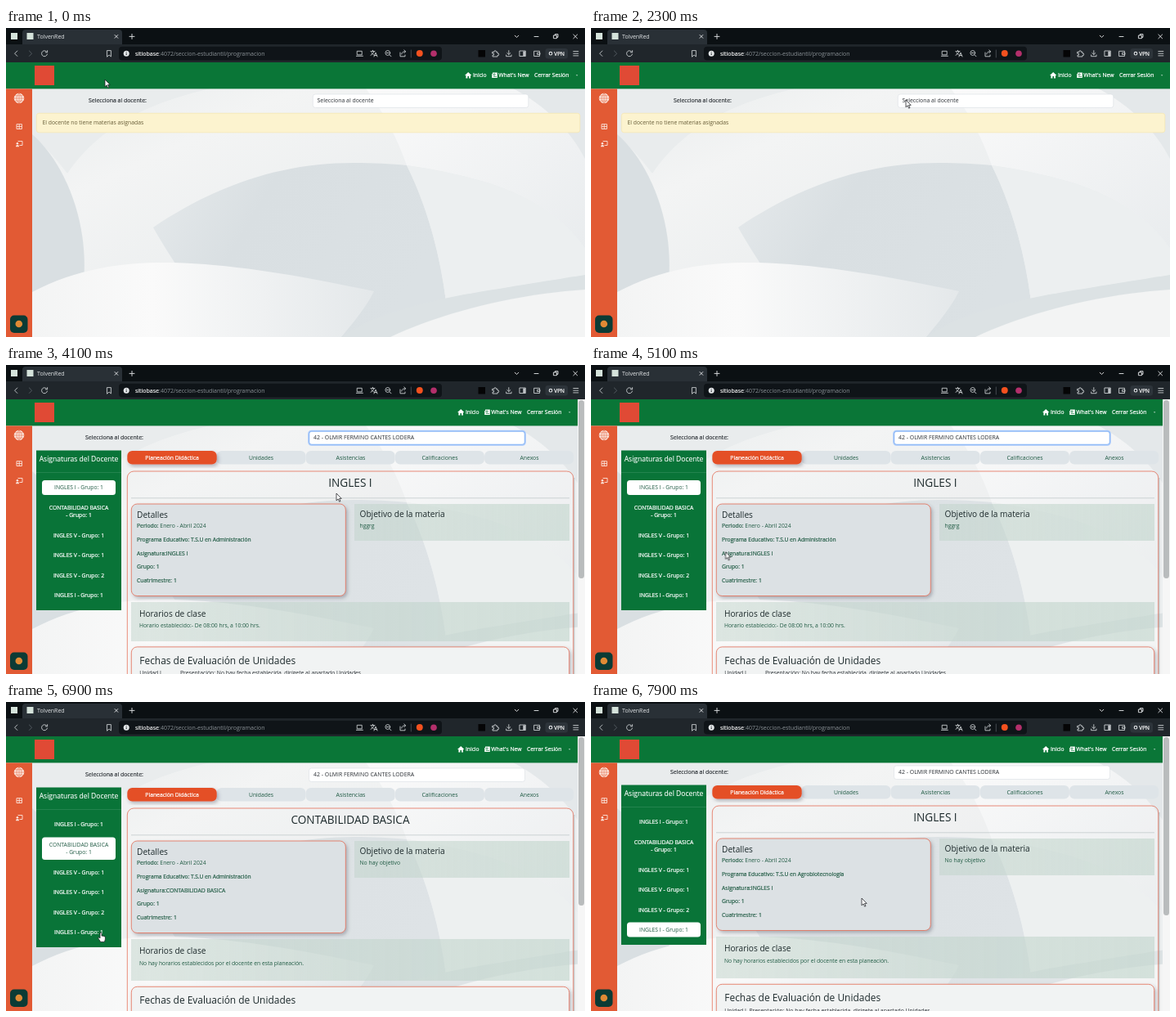
Recreate the animation shown at these times as an HTML page. Size 708 by 378 pixels, loop 8 s.

```html
<!DOCTYPE html>
<html lang="es">
<head>
<meta charset="utf-8">
<title>Planeaciones</title>
<style>
html, body { margin: 0; width: 100%; height: 100%; overflow: hidden; background: #eef0f0; }
svg { display: block; width: 100vw; height: 100vh; }
text { font: 6.8px "Open Sans", "Noto Sans", sans-serif; fill: #1f5a43; white-space: pre; }
.mid { text-anchor: middle; }
.med { stroke: #1f5a43; stroke-width: .18; }
.white { fill: #fff; stroke: #fff; stroke-width: .22; }
.dark { fill: #2b3035; }
.bold { stroke: #2b3035; stroke-width: .18; }
.h1 { font-size: 13.6px; fill: #1d2a2c; text-anchor: middle; }
.h2 { font-size: 10.15px; fill: #1d2a2c; }
.h3 { font-size: 11.95px; fill: #1d2a2c; }
.line { fill: none; stroke: #c9cdd0; stroke-width: .9; stroke-linecap: round; stroke-linejoin: round; }
.side { fill: none; stroke: #fbe6de; stroke-width: .9; }
.card { stroke: #e2654c; stroke-width: .75; }
.mint { fill: url(#mint); }
.ring { fill: none; stroke: #a9c9fb; stroke-width: 1.6; }
.edge { fill: #fff; stroke: #d9dee2; stroke-width: .6; }
.focused { stroke: #6ea6f5; stroke-width: .7; fill: none; }

.empty, .full, .scroll, .v1, .v2, .v3, .nav, .focus, .arrow, .hand, .dates, .list1, .list2, .list6, .cursor {
  animation: 8s step-end infinite;
}
.empty { animation-name: empty; }
.full { animation-name: full, nudge; }
.scroll { animation-name: full; }
.v1 { animation-name: first; }
.v2 { animation-name: second; }
.v3 { animation-name: third; }
.nav { animation-name: nav; }
.focus { animation-name: focus; }
.arrow { animation-name: arrow; }
.hand { animation-name: hand; }
.dates { animation-name: dates; }
.list1 { animation-name: lit1; animation-timing-function: linear; }
.list2 { animation-name: lit2; animation-timing-function: linear; }
.list6 { animation-name: lit6; animation-timing-function: linear; }
.cursor { animation-name: move; animation-timing-function: linear; }

@keyframes empty { 0% { visibility: visible } 47.5%, 100% { visibility: hidden } }
@keyframes full { 0% { visibility: hidden } 47.5%, 100% { visibility: visible } }
@keyframes first { 0% { visibility: hidden } 47.5% { visibility: visible } 70%, 100% { visibility: hidden } }
@keyframes second { 0% { visibility: hidden } 70% { visibility: visible } 92.5%, 100% { visibility: hidden } }
@keyframes third { 0% { visibility: hidden } 92.5%, 100% { visibility: visible } }
@keyframes nudge { 0% { transform: none } 92.5%, 100% { transform: translateY(-3px) } }
@keyframes nav { 0% { transform: none } 47.5%, 100% { transform: translateX(-9px) } }
@keyframes focus { 0% { opacity: 0 } 31.25% { opacity: 1 } 70%, 100% { opacity: 0 } }
@keyframes dates { 0% { transform: translateY(-3.4px) } 70%, 100% { transform: none } }
@keyframes arrow { 0% { visibility: visible } 64% { visibility: hidden } 93.75%, 100% { visibility: visible } }
@keyframes hand { 0% { visibility: hidden } 64% { visibility: visible } 93.75%, 100% { visibility: hidden } }
@keyframes lit1 { 0%, 70.8% { opacity: 1 } 73.4%, 100% { opacity: 0 } }
@keyframes lit2 { 0%, 70.6% { opacity: 0 } 73.2%, 93% { opacity: 1 } 95.6%, 100% { opacity: 0 } }
@keyframes lit6 { 0%, 93% { opacity: 0 } 95.6%, 100% { opacity: 1 } }
@keyframes move {
  0%, 1.25% { transform: translate(121px, 63px) }
  6.25% { transform: translate(430px, 58px) }
  10% { transform: translate(655px, 90px) }
  12.5% { transform: translate(620px, 143px) }
  13.75%, 18.75% { transform: translate(621px, 136px) }
  22.5% { transform: translate(560px, 146px) }
  25.5% { transform: translate(360px, 112px) }
  27.5% { transform: translate(330px, 75px) }
  28.75%, 31.25% { transform: translate(385px, 88px) }
  41.25% { transform: translate(403px, 156px) }
  42.5%, 57.5% { transform: translate(404px, 157px) }
  60% { transform: translate(330px, 230px) }
  62.5% { transform: translate(210px, 268px) }
  65% { transform: translate(120px, 190px) }
  66.9% { transform: translate(108px, 114px) }
  68.75%, 71.25% { transform: translate(112.5px, 185px) }
  80% { transform: translate(117px, 232px) }
  83.75% { transform: translate(121px, 268px) }
  86.25%, 92.5% { transform: translate(116px, 282px) }
  98.75%, 100% { transform: translate(331px, 240px) }
}
</style>
</head>
<body>
<svg viewBox="0 0 708 378" preserveAspectRatio="none">
  <defs>
    <linearGradient id="base" x1="0" y1="0" x2="1" y2="1">
      <stop offset="0" stop-color="#e6eaeb"/><stop offset=".3" stop-color="#f3f4f4"/>
      <stop offset=".65" stop-color="#eaedee"/><stop offset="1" stop-color="#f4f5f5"/>
    </linearGradient>
    <linearGradient id="hill" x1="0" y1="0" x2="1" y2=".35">
      <stop offset="0" stop-color="#e6eaec"/><stop offset=".4" stop-color="#d9dfe2"/><stop offset="1" stop-color="#dbe1e4"/>
    </linearGradient>
    <linearGradient id="snow" x1="0" y1="0" x2="1" y2="0">
      <stop offset="0" stop-color="#f3f4f4"/><stop offset=".35" stop-color="#fafafa"/><stop offset="1" stop-color="#e4e8ea"/>
    </linearGradient>
    <linearGradient id="petal" x1="0" y1="0" x2="1" y2="1">
      <stop offset="0" stop-color="#fafafa"/><stop offset="1" stop-color="#e9ecee"/>
    </linearGradient>
    <linearGradient id="mint">
      <stop offset="0" stop-color="#bfd2c9" stop-opacity=".5"/><stop offset="1" stop-color="#c3d6cd" stop-opacity=".65"/>
    </linearGradient>
    <filter id="drop" x="-5%" y="-10%" width="112%" height="135%">
      <feDropShadow dx="2" dy="2.5" stdDeviation="2" flood-color="#445" flood-opacity=".35"/>
    </filter>
  </defs>

  <!-- backdrop -->
  <rect y="42" width="708" height="336" fill="url(#base)"/>
  <path d="M32 74H250C190 88 120 112 75 178C60 158 45 142 32 132Z" fill="#e9eced"/>
  <path d="M32 130C72 165 104 240 94 320L32 340Z" fill="#d9dfe2"/>
  <path d="M440 74H708V270C680 230 640 205 585 188C550 178 520 172 490 168C478 134 463 105 440 74Z" fill="url(#petal)"/>
  <path d="M620 74H708V160C690 125 660 95 620 74Z" fill="#e4e8ea"/>
  <path d="M180 244C260 190 340 165 425 165C450 165 470 166 490 168C512 212 530 270 538 334L470 378H260C230 320 200 280 180 244Z" fill="url(#hill)"/>
  <path d="M490 168C520 172 550 178 585 188C640 205 680 230 708 270V310C640 312 590 322 538 334C530 270 512 212 490 168Z" fill="#eceff0"/>
  <path d="M32 323C90 292 150 286 205 287C300 290 390 310 450 322C440 342 425 360 410 378H32Z" fill="url(#snow)"/>
  <path d="M410 378C450 350 500 338 560 326C620 316 670 308 708 302V378Z" fill="#dce2e4"/>
  <path d="M470 378C540 345 630 325 708 320V378Z" fill="#f3f4f4"/>

  <!-- no subjects assigned -->
  <g class="empty">
    <text class="dark bold" x="101" y="91.4" style="font-size:6.9px">Selecciona al docente:</text>
    <rect class="edge" x="375.3" y="81" width="263.5" height="16.5" rx="3"/>
    <g class="focus">
      <rect class="ring" x="374.7" y="80.5" width="264.7" height="17.5" rx="3.4"/>
      <rect class="focused" x="375.5" y="81.2" width="263" height="16" rx="3"/>
    </g>
    <text class="dark" x="380.5" y="91.4" style="font-size:6.9px">Selecciona al docente</text>
    <rect x="37.3" y="104.3" width="664.5" height="23.5" rx="3" fill="#fcf3cf" stroke="#f5e6ae" stroke-width=".7"/>
    <text x="44.5" y="118.4" style="fill:#665c37">El docente no tiene materias asignadas</text>
  </g>

  <!-- teacher chosen -->
  <g class="full">
    <text class="dark bold" x="97" y="91.4" style="font-size:6.9px">Selecciona al docente:</text>
    <rect class="edge" x="370.5" y="81" width="264" height="16.5" rx="3"/>
    <g class="focus">
      <rect class="ring" x="370" y="80.5" width="265" height="17.5" rx="3.4"/>
      <rect class="focused" x="370.8" y="81.2" width="263.4" height="16" rx="3"/>
    </g>
    <text class="dark" x="376" y="91.4" style="font-size:6.95px">42 - OLMIR FERMINO CANTES LODERA</text>

    <rect x="37" y="104.5" width="104" height="195.5" fill="#097438"/>
    <path d="M37 131.5H141" stroke="#2f8c58" stroke-width=".7"/>
    <text class="white mid" x="89" y="118.4" style="font-size:8.55px;stroke-width:.1">Asignaturas del Docente</text>
    <g class="mid">
      <text class="white" x="89" y="152">INGLES I - Grupo: 1</text>
      <text class="white" x="89" y="176.5">CONTABILIDAD BASICA</text>
      <text class="white" x="89" y="186.3">- Grupo: 1</text>
      <text class="white" x="89" y="210.8">INGLES V - Grupo: 1</text>
      <text class="white" x="89" y="235.2">INGLES V - Grupo: 1</text>
      <text class="white" x="89" y="259.5">INGLES V - Grupo: 2</text>
      <text class="white" x="89" y="283.6">INGLES I - Grupo: 1</text>
      <g class="list1">
        <rect x="44" y="141" width="90" height="18" rx="3.5" fill="#fff"/>
        <text x="89" y="152">INGLES I - Grupo: 1</text>
      </g>
      <g class="list2">
        <rect x="44" y="165.5" width="90" height="27.5" rx="3.5" fill="#fff"/>
        <text x="89" y="176.5">CONTABILIDAD BASICA</text>
        <text x="89" y="186.3">- Grupo: 1</text>
      </g>
      <g class="list6">
        <rect x="44" y="272.5" width="90" height="18" rx="3.5" fill="#fff"/>
        <text x="89" y="283.6">INGLES I - Grupo: 1</text>
      </g>
    </g>

    <g fill="#dee4e8">
      <rect x="257.5" y="105" width="109" height="16.5" rx="6"/>
      <rect x="366.7" y="105" width="109" height="16.5" rx="6"/>
      <rect x="475.9" y="105" width="109" height="16.5" rx="6"/>
      <rect x="585.1" y="105" width="109" height="16.5" rx="6"/>
    </g>
    <rect x="148.3" y="105" width="109.4" height="16.5" rx="6" fill="#e44f26" filter="url(#drop)"/>
    <g class="mid">
      <text class="white" x="203" y="116">Planeación Didáctica</text>
      <text x="312" y="116">Unidades</text>
      <text x="421.5" y="116" style="font-size:7px">Asistencias</text>
      <text x="530.5" y="116" style="font-size:7px">Calificaciones</text>
      <text x="640" y="116">Anexos</text>
    </g>

    <rect class="card" x="148.3" y="130" width="545.4" height="300" rx="8" fill="#f6f7f7" fill-opacity=".12"/>
    <path d="M694.8 138V382" stroke="#8d9596" stroke-opacity=".4" stroke-width="1.4"/>
    <path d="M153 162.8H689" stroke="#bcc4c6" stroke-width=".7"/>
    <rect class="card" x="153.3" y="170" width="262" height="112.5" rx="7" fill="#dce1e4" filter="url(#drop)"/>
    <rect class="mint" x="426" y="170" width="263" height="45"/>
    <text class="h2" x="160" y="186.5">Detalles</text>
    <text class="h2" x="432.5" y="186.2">Objetivo de la materia</text>
    <text x="160" y="199.4"><tspan class="med">Periodo:</tspan> Enero - Abril 2024</text>
    <text class="med" x="160" y="249.1">Grupo: 1</text>
    <text class="med" x="160" y="265.7">Cuatrimestre: 1</text>

    <g class="v1">
      <rect class="mint" x="153" y="290" width="536" height="48"/>
      <text class="h1" x="421" y="149">INGLES I</text>
      <text class="med" x="160" y="216" style="font-size:6.7px">Programa Educativo: T.S.U en Administración</text>
      <text class="med" x="160" y="232.5">Asignatura:INGLES I</text>
      <text x="432.5" y="198.9">hggrg</text>
      <text x="163" y="321.3">Horario establecido:- De 08:00 hrs, a 10:00 hrs.</text>
    </g>
    <g class="v2">
      <rect class="mint" x="153" y="290" width="536" height="51"/>
      <text class="h1" x="421" y="149">CONTABILIDAD BASICA</text>
      <text class="med" x="160" y="216" style="font-size:6.7px">Programa Educativo: T.S.U en Administración</text>
      <text class="med" x="160" y="232.5">Asignatura:CONTABILIDAD BASICA</text>
      <text x="432.5" y="198.9">No hay objetivo</text>
      <text x="163" y="321.5" style="font-size:6.75px">No hay horarios establecidos por el docente en esta planeación.</text>
    </g>
    <g class="v3">
      <rect class="mint" x="153" y="290" width="536" height="51"/>
      <text class="h1" x="421" y="149">INGLES I</text>
      <text class="med" x="160" y="216" style="font-size:6.7px">Programa Educativo: T.S.U en Agrobiotecnología</text>
      <text class="med" x="160" y="232.5">Asignatura:INGLES I</text>
      <text x="432.5" y="198.9">No hay objetivo</text>
      <text x="163" y="321.5" style="font-size:6.75px">No hay horarios establecidos por el docente en esta planeación.</text>
    </g>
    <text class="h2" x="163" y="308.3">Horarios de clase</text>

    <g class="dates">
      <rect class="card" x="153.3" y="348.3" width="535.4" height="80" rx="7" fill="#f1f3f3" filter="url(#drop)"/>
      <text class="h3" x="163.3" y="369">Fechas de Evaluación de Unidades</text>
      <g class="v1">
        <text x="163.3" y="382.8" class="dark">Unidad I</text>
        <text x="213" y="382.8" class="dark">Presentación: No hay fecha establecida, dirígete al apartado Unidades.</text>
      </g>
      <g class="v2"><text x="163.3" y="382.6" class="dark">Unidad I. Presentación: No hay fecha establecida, dirígete al apartado Unidades</text></g>
      <g class="v3"><text x="163.3" y="382.6" class="dark">Unidad I. Presentación: No hay fecha establecida, dirígete al apartado Unidades</text></g>
    </g>
  </g>

  <!-- site header and side bar -->
  <rect y="42" width="708" height="32.4" fill="#0a7637"/>
  <rect x="35" y="46" width="24" height="24" fill="#e04a35"/>
  <g class="nav">
    <path d="M561 58L565.2 54L569.4 58H568V61.6H566V59H564.4V61.6H562.4V58Z" fill="#fff"/>
    <text class="white" x="571" y="60.3" style="font-size:6.7px">Inicio</text>
    <path d="M595 54.5H600.8V61H594.2V56H595Z" fill="#fff"/>
    <path d="M596 56H598V58H596ZM596 59.5H600" fill="none" stroke="#0a7637" stroke-width=".6"/>
    <text class="white" x="602.3" y="60.3">What's New</text>
    <text class="white" x="646" y="60.3" style="font-size:6.75px">Cerrar Sesión</text>
    <path d="M696.8 57.4H699.4L698.1 58.6Z" fill="#fff"/>
  </g>
  <rect y="74.4" width="32" height="303.6" fill="#e25a34"/>
  <g class="side">
    <circle cx="16" cy="86" r="5.8" fill="#fbe6de"/>
    <path d="M10 86H22M11 82.8H21M11 89.2H21M16 80V92M16 79.8C12 83 12 89 16 92.2C20 89 20 83 16 79.8" stroke="#e25a34" stroke-width=".5"/>
    <path d="M13 117.7H19.4V123.5H13ZM13 120.6H19.4M16.2 117.7V123.5"/>
    <path d="M14.5 138.5H20V143.5H16.5"/>
    <path d="M12 145.2C12 142.4 16 142.4 16 145.2Z" fill="#fbe6de" stroke="none"/>
    <circle cx="13.9" cy="141.2" r="1.3" fill="#fbe6de" stroke="none"/>
  </g>
  <rect x="5" y="351.5" width="21.5" height="21.5" rx="5" fill="#0c3b35"/>
  <circle cx="15.8" cy="362" r="4.3" fill="#e08a35"/>

  <!-- scroll bar -->
  <g class="scroll">
    <rect x="699" y="42" width="9" height="336" fill="#f6f6f6"/>
    <g fill="#b9bcbd">
      <rect class="v1" x="700" y="43" width="7" height="218" rx="3.5"/>
      <rect class="v2" x="700" y="43" width="7" height="206" rx="3.5"/>
      <rect class="v3" x="700" y="43" width="7" height="218" rx="3.5"/>
    </g>
  </g>

  <!-- browser window -->
  <rect width="708" height="21" fill="#0b1013"/>
  <path d="M20 20V6Q20 2 24 2H138Q142 2 142 6V20Z" fill="#293036"/>
  <rect y="20" width="708" height="22" fill="#20262b"/>
  <rect x="138" y="22.8" width="395" height="16.6" rx="4" fill="#0f1418"/>
  <rect x="6" y="6" width="8" height="8" fill="#d5e3db"/>
  <rect x="25.5" y="6" width="8" height="8" fill="#d5e3db"/>
  <text x="38" y="12.6" style="fill:#e3e6e8;font-size:7px">TolvenRed</text>
  <text x="158" y="33.6" style="fill:#8b9297;font-size:7px"><tspan fill="#fff" stroke="#fff" stroke-width=".15">sitiobase</tspan>:4072/seccion-estudiantil/programacion</text>
  <g class="line">
    <path d="M133 8.5L136.8 12.3M136.8 8.5L133 12.3M151 10.4H157M154 7.4V13.4" stroke="#e6e8ea"/>
    <path d="M622.2 9.2L624.5 11.5L626.8 9.2M646 10.5H651M669.8 9H673.5V12.7H669.8ZM671.3 9V7.6H675V11.3H673.5M693.8 8L698.6 12.8M698.6 8L693.8 12.8" stroke="#e6e8ea"/>
    <path d="M13.8 28L10.6 31.2L13.8 34.4"/>
    <path d="M28.4 28L31.6 31.2L28.4 34.4" stroke="#596067"/>
    <path d="M50 29.3A3.5 3.5 0 1 0 50.5 32M50.6 27.6V29.8H48.4"/>
    <path d="M123.8 27.6H128.4V35L126.1 33L123.8 35Z"/>
    <path d="M429.6 28.3H435.2V32.8H429.6ZM428.4 34.3H436.4"/>
    <path d="M446 28.5H451M448.5 27.3V28.5M450 28.5C449.5 31 448 32.3 446 33.2M447 30C448 32 449 32.7 450 33M450 35L452 30L454 35M450.7 33.5H453.3"/>
    <circle cx="466.8" cy="30.5" r="2.9"/>
    <path d="M469 32.8L471 34.8M465.4 30.5H468.2"/>
    <path d="M482 30V34.8H488V33M483.8 32C484 29.5 485.5 28.8 488.5 28.8M486.8 27L488.7 28.8L486.8 30.6"/>
    <path d="M495.3 27V36" stroke="#4b5157"/>
    <path d="M595 29.3H597A1.2 1.2 0 1 1 599.3 29.3H601V31.2A1.2 1.2 0 1 1 601 33.4V35H595V33.2A1.2 1.2 0 1 0 595 31Z"/>
    <path d="M614.8 27.6V32.4M612.8 30.6L614.8 32.5L616.8 30.6M611.6 33V34.7H618V33"/>
    <path d="M628.3 28H635.3V34.5H628.3Z"/><path d="M633.6 28.5V34" stroke-width="2.5" stroke-linecap="butt"/>
    <path d="M646 28.3H652.5V34.5H646ZM650 30.3H653V32.5H650Z"/>
    <path d="M693.8 28.5H699.8M693.8 31.2H699.8M693.8 33.9H699.8"/>
  </g>
  <circle cx="147.2" cy="31.2" r="3.5" fill="#e4e7e9"/>
  <path d="M147.2 30.8V33M147.2 29V29.8" stroke="#0f1418" stroke-width=".9"/>
  <circle cx="505.8" cy="31" r="4" fill="#f4511f"/>
  <circle cx="523" cy="31.2" r="3.8" fill="#b32f6b"/>
  <rect x="577.5" y="27" width="8.5" height="8.5" fill="#050506"/>
  <rect x="659.5" y="25" width="27.5" height="12.5" rx="3" fill="#2d343a"/>
  <circle cx="666" cy="31.2" r="1.8" fill="none" stroke="#dfe2e4" stroke-width="1.1"/>
  <text class="white" x="670.3" y="33.6" style="font-size:6.5px">VPN</text>

  <!-- pointer -->
  <g class="cursor">
    <path class="arrow" d="M0 0V8.8L2.1 6.9L3.6 10.2L5 9.6L3.5 6.4H6.2Z" fill="#fff" stroke="#1b1d20" stroke-width=".75"/>
    <path class="hand" d="M-1 1C-1 -.4 1 -.4 1 1V4.3C1.6 3.7 2.5 3.9 2.6 4.6C3.2 4.1 4 4.4 4.1 5C4.8 4.7 5.4 5 5.4 5.8V8C5.4 9.5 4.6 10 4.4 11.4H-.6C-.9 9.9 -2.4 8.6 -3.2 7C-3.4 5.9 -2.2 5.6 -1 7Z" fill="#fff" stroke="#1b1d20" stroke-width=".75"/>
  </g>
</svg>
</body>
</html>
```
